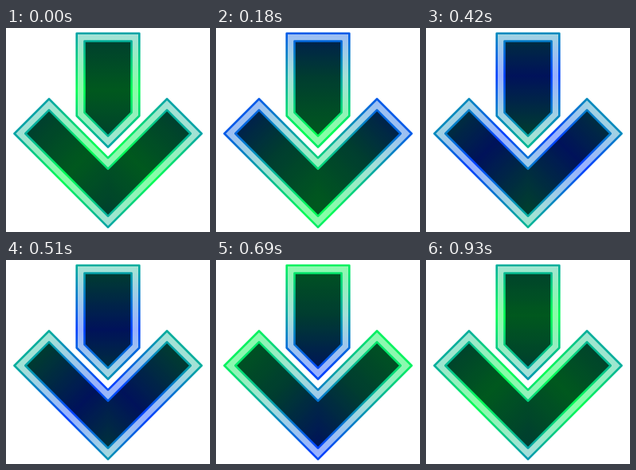
Recreate the animation shown at these times as an HTML page with a canvas. Size 256 px wide and 256 px high, loop 960 ms.

```html
<!DOCTYPE html>
<html lang="en">
<head>
<meta charset="utf-8">
<style>
  html, body { margin: 0; width: 100%; height: 100%; overflow: hidden; background: #fff; }
  canvas { display: block; width: 256px; height: 256px; }
</style>
</head>
<body>
<canvas id="stage" width="256" height="256"></canvas>
<script>
const ctx = document.getElementById('stage').getContext('2d');
const SIZE = 256, LOOP = 960, STEP = 30, STOPS = 32;
const LINE = 2.6, OUTER = 0.7, INNER = 10.5;

// Each palette runs from green through teal to blue.
const EDGE = [[0, 255, 84], [0, 162, 166], [0, 64, 255]];
const BAND = [[134, 255, 166], [164, 224, 216], [152, 176, 255]];
const CORE = [[0, 88, 30], [0, 60, 48], [0, 18, 90]];

// Outlines inset by d pixels from the outer border.
function bolt(d) {
  const shoulder = 110.5 - d * (Math.SQRT2 - 1);
  return [[88 + d, 6 + d], [168 - d, 6 + d], [168 - d, shoulder],
          [128, 150.5 - d * Math.SQRT2], [88 + d, shoulder]];
}

function chevron(d) {
  const r = d * Math.SQRT2;
  return [[54, 88 + r], [128, 162 + r], [202, 88 + r],
          [246.5 - r, 132.5], [128, 251 - r], [9.5 + r, 132.5]];
}

// The colour runs down the bolt and along each arm of the chevron.
const PARTS = [
  { outline: bolt, left: 0, width: SIZE, axis: [128, 6, 128, 150.5] },
  { outline: chevron, left: 0, width: SIZE / 2, axis: [71, 71, 189.5, 189.5] },
  { outline: chevron, left: SIZE / 2, width: SIZE / 2, axis: [185, 71, 66.5, 189.5] }
];

// Triangle wave: 0 is teal, +1 blue, -1 green.
function wave(phase) {
  const p = ((phase + 0.25) % 1 + 1) % 1;
  return 1 - 4 * Math.abs(p - 0.5);
}

function shade(palette, w) {
  const end = palette[w < 0 ? 0 : 2], k = Math.abs(w);
  return `rgb(${palette[1].map((m, i) => Math.round(m + (end[i] - m) * k)).join(',')})`;
}

function gradient(palette, axis, phase) {
  const g = ctx.createLinearGradient(...axis);
  for (let i = 0; i <= STOPS; i++) {
    const u = i / STOPS;
    g.addColorStop(u, shade(palette, wave(phase - u / 2)));
  }
  return g;
}

function paintOutline(points, fill) {
  ctx.beginPath();
  points.forEach(([x, y]) => ctx.lineTo(x, y));
  ctx.closePath();
  ctx.fillStyle = fill;
  ctx.fill();
  ctx.stroke();
}

function drawPart({ outline, left, width, axis }, phase) {
  ctx.save();
  ctx.beginPath();
  ctx.rect(left, 0, width, SIZE);
  ctx.clip();
  ctx.lineWidth = LINE;
  ctx.lineJoin = 'round';
  ctx.strokeStyle = gradient(EDGE, axis, phase);
  paintOutline(outline(OUTER), gradient(BAND, axis, phase));
  paintOutline(outline(INNER), gradient(CORE, axis, phase));
  ctx.restore();
}

function render(now) {
  const time = Math.floor((now % LOOP) / STEP) * STEP;
  ctx.fillStyle = '#fff';
  ctx.fillRect(0, 0, SIZE, SIZE);
  PARTS.forEach(part => drawPart(part, time / LOOP));
}

let start;
function tick(now) {
  start ??= now;
  render(now - start);
  requestAnimationFrame(tick);
}
render(0);
requestAnimationFrame(tick);
</script>
</body>
</html>
```
